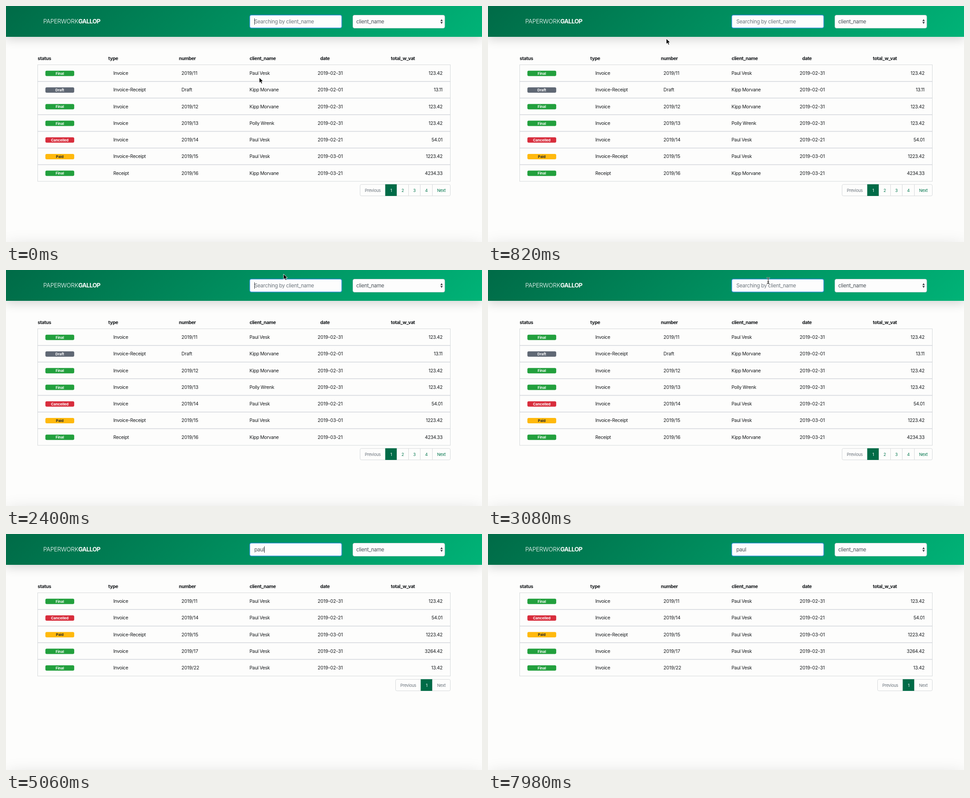
An HTML page for the animation above (8 s loop, 1060 px wide and 528 px high).

```html
<!DOCTYPE html>
<html lang="en">
<head>
<meta charset="utf-8">
<title>Document list search</title>
<style>
  html, body { margin: 0; width: 100%; height: 100%; overflow: hidden; background: #fdfdfc; }
  body { position: relative; font-family: Inter, "Open Sans", sans-serif; }
  .bar, .foot, svg { position: absolute; left: 0; width: 1060px; }
  .bar {
    top: 0; height: 69px;
    background: linear-gradient(135deg, #006b47, #00b377);
    box-shadow: 0 7px 20px rgba(0, 0, 0, .15);
  }
  .foot { top: 528px; height: 60px; box-shadow: 0 13px 40px rgba(0, 0, 0, .175); }
  svg { top: 0; height: 528px; }

  .logo { font-size: 13.2px; font-weight: 300; letter-spacing: -.02em; fill: #fff; }
  .logo .strong { font-weight: 700; letter-spacing: -.045em; }
  .field { font-size: 11.5px; letter-spacing: -.025em; fill: #495057; }
  .hint { fill: #6c757d; }
  .head { font-size: 10.4px; font-weight: 700; letter-spacing: -.028em; fill: #16191c; }
  .cell { font-size: 10.4px; letter-spacing: -.03em; fill: #16191c; }
  .code { letter-spacing: -.006em; }
  .badge { font-size: 8px; font-weight: 700; text-anchor: middle; }
  .page { font-size: 9.2px; letter-spacing: -.03em; text-anchor: middle; fill: #00754c; }
  .off { fill: #6c757d; }
  .on { fill: #fff; }
  .end { text-anchor: end; }
  .rule { stroke: #d3d6dc; stroke-width: 1.6; }
  .frame { fill: none; stroke: #d6d9db; }

  /* One 8 s clock for everything */
  #all, #found, #pointer, #arrow, #beam { animation: 8s linear infinite; }
  #all { animation-name: leave; animation-timing-function: step-end; }
  #found { animation-name: enter; animation-timing-function: step-end; }
  #pointer { animation-name: roam; animation-timing-function: ease-in-out; }
  #arrow { animation-name: arrow; animation-timing-function: step-end; }
  #beam { animation-name: beam; animation-timing-function: step-end; }

  @keyframes leave { 0% { opacity: 1 } 57%, 100% { opacity: 0 } }
  @keyframes enter { 0% { opacity: 0 } 57%, 100% { opacity: 1 } }
  @keyframes arrow { 0% { opacity: 1 } 33.5%, 100% { opacity: 0 } }
  @keyframes beam { 0% { opacity: 0 } 33.5% { opacity: 1 } 54.25%, 100% { opacity: 0 } }
  @keyframes roam {
    0% { transform: translate(564px, 160px) }
    10.25% { transform: translate(397px, 73px) }
    19% { transform: translate(326px, 110px) }
    30% { transform: translate(618px, 9px) }
    36%, 100% { transform: translate(624px, 24px) }
  }
</style>
</head>
<body>
<div class="bar"></div>
<div class="foot"></div>
<svg viewBox="0 0 1060 528">
  <text class="logo" x="83" y="38.8">PAPERWORK<tspan class="strong">GALLOP</tspan></text>

  <rect x="542" y="19.5" width="206.5" height="30.5" rx="4.5" fill="#2b8fd0"/>
  <rect x="543.5" y="21" width="203.5" height="27.5" rx="3.2" fill="#fdfdfd"/>
  <text id="hint" class="field hint" x="553" y="39">Searching by client_name</text>
  <text id="typed" class="field" x="553" y="39"></text>
  <rect id="caret" x="553" y="27.5" width="1" height="14.5" fill="#343a40"/>

  <rect x="772.5" y="20.5" width="204.5" height="29" rx="3.5" fill="#fdfdfd" stroke="#ced4da"/>
  <text class="field" x="780" y="39">client_name</text>
  <path d="M967.3 33.8L970 29.6L972.7 33.8ZM967.3 35.8L970 40L972.7 35.8Z" fill="#343a40"/>

  <g id="heads"></g>
  <g id="all"></g>
  <g id="found"></g>

  <g id="pointer">
    <path id="arrow" d="M0 0V12.2L2.8 9.6L4.7 14L6.9 13.1L5 8.8H8.8Z" fill="#000" stroke="#fff" stroke-width=".9"/>
    <g id="beam" fill="none" stroke-linecap="round">
      <path d="M-2.6-6.5Q0-6.5 0-4.5Q0-6.5 2.6-6.5M0-4.5V4.5M-2.6 6.5Q0 6.5 0 4.5Q0 6.5 2.6 6.5M-1.6 2.5H1.6" stroke="#fff" stroke-width="2.2"/>
      <path d="M-2.6-6.5Q0-6.5 0-4.5Q0-6.5 2.6-6.5M0-4.5V4.5M-2.6 6.5Q0 6.5 0 4.5Q0 6.5 2.6 6.5M-1.6 2.5H1.6" stroke="#111" stroke-width="1.1"/>
    </g>
  </g>
</svg>
<script>
const TOP = 131.5, STEP = 37.25, LEFT = 70.5, RIGHT = 989.5;
const $ = id => document.getElementById(id);
const text = (cls, x, y, s) => `<text class="${cls}" x="${x}" y="${y}">${s}</text>`;
const box = (x, y, w, h, attrs) => `<rect x="${x}" y="${y}" width="${w}" height="${h}" ${attrs}/>`;

const COLORS = { Final: '#22a03d', Draft: '#606874', Cancelled: '#d82d3c', Paid: '#ffb90d' };
const [PAUL, KIPP, POLLY] = ['Paul Vesk', 'Kipp Morvane', 'Polly Wrenk'];

const allRows = [
  ['Final', 'Invoice', '2019/11', PAUL, '2019-02-31', '123.42'],
  ['Draft', 'Invoice-Receipt', 'Draft', KIPP, '2019-02-01', '13.11'],
  ['Final', 'Invoice', '2019/12', KIPP, '2019-02-31', '123.42'],
  ['Final', 'Invoice', '2019/13', POLLY, '2019-02-31', '123.42'],
  ['Cancelled', 'Invoice', '2019/14', PAUL, '2019-02-21', '54.01'],
  ['Paid', 'Invoice-Receipt', '2019/15', PAUL, '2019-03-01', '1223.42'],
  ['Final', 'Receipt', '2019/16', KIPP, '2019-03-21', '4234.33']
];
const foundRows = [
  ...allRows.filter(row => row[3] === PAUL),
  ['Final', 'Invoice', '2019/17', PAUL, '2019-02-31', '3264.42'],
  ['Final', 'Invoice', '2019/22', PAUL, '2019-02-31', '13.42']
];

function drawRow([status, type, number, client, date, total], i) {
  const y = TOP + i * STEP, base = y + 22.7;
  const ink = status === 'Paid' ? '#212529' : '#fff';
  return (i ? `<path class="rule" d="M${LEFT} ${y}H${RIGHT}"/>` : '') +
    box(87.7, y + 13.2, 64.2, 12, `rx="3" fill="${COLORS[status]}"`) +
    `<text class="badge" x="119.8" y="${y + 22.3}" fill="${ink}">${status}</text>` +
    text('cell', 239, base, type) +
    text('cell code', 390.8, base, number) +
    text('cell', 542.3, base, client) +
    text('cell code', 694, base, date) +
    text('cell end', 972, base, total);
}

// Each pager item: label, left edge, class
function drawPager(y, items) {
  const left = items[0][1];
  let out = box(left, y, RIGHT - left, 25.5, 'class="frame" rx="3"');
  items.forEach(([label, x, cls], i) => {
    const next = i + 1 < items.length ? items[i + 1][1] : RIGHT;
    if (cls === 'on') out += box(x - .5, y - .5, next - x + .5, 26.2, 'fill="#006b47"');
    else if (i) out += `<path class="frame" d="M${x} ${y}v25.5"/>`;
    out += text('page ' + cls, (x + next) / 2, y + 16.2, label);
  });
  return out;
}

function drawTable(rows, items) {
  const h = rows.length * STEP;
  return rows.map(drawRow).join('') +
    box(LEFT, TOP, RIGHT - LEFT, h, 'class="frame"') +
    drawPager(Math.round(TOP + h) + 7.3, items);
}

$('heads').innerHTML = ['status', 'type', 'number', 'client_name', 'date', 'total_w_vat']
  .map((name, i) => text('head', 70.5 + i * 157.3, 121, name)).join('');
$('all').innerHTML = drawTable(allRows, [
  ['Previous', 788.5, 'off'], ['1', 845, 'on'], ['2', 870.5, ''],
  ['3', 896.5, ''], ['4', 922.5, ''], ['Next', 949.5, '']
]);
$('found').innerHTML = drawTable(foundRows, [
  ['Previous', 867.5, 'off'], ['1', 924, 'on'], ['Next', 949.5, 'off']
]);

const WORD = 'paul', KEYS = [4340, 4560, 4760, 4920], BLINK = 1200;
let start;

function tick(now) {
  start ??= now;
  const t = (now - start) % 8000;
  const count = KEYS.filter(k => k <= t).length;
  // Every key press restarts the blink
  const since = count ? t - KEYS[count - 1] : t + 340;
  $('typed').textContent = WORD.slice(0, count);
  $('hint').style.opacity = count ? 0 : 1;
  $('caret').setAttribute('x', 553 + (count ? $('typed').getComputedTextLength() : 0));
  $('caret').style.opacity = since % BLINK < BLINK / 2 ? 1 : 0;
  requestAnimationFrame(tick);
}
requestAnimationFrame(tick);
</script>
</body>
</html>
```
